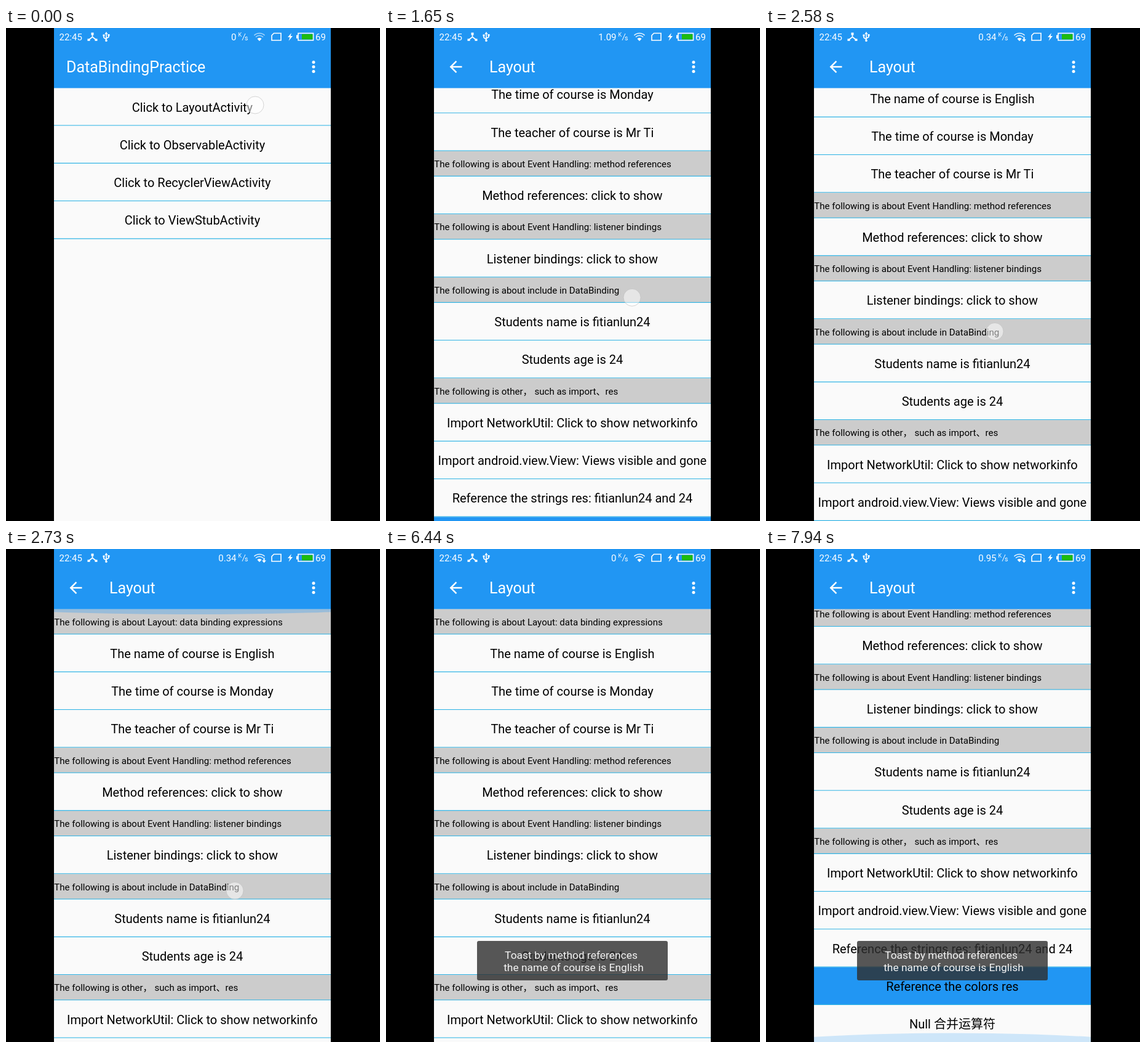
These frames come from a looping animation (608x800 px, 7990 ms). An HTML page:

```html
<!DOCTYPE html>
<html lang="zh-CN">
<head>
<meta charset="utf-8">
<style>
html, body { margin: 0; width: 100%; height: 100%; overflow: hidden; background: #000; }
svg { display: block; }
text { font-family: Roboto, "Noto Sans CJK SC", "Noto Sans CJK", sans-serif; white-space: pre; }
.row { font-size: 20px; text-anchor: middle; fill: #000; }
.head { font-size: 15.07px; fill: #000; }
.title { font-size: 25px; fill: #fff; }
.status { font-size: 15px; fill: #fff; }
.toast { font-size: 17.4px; text-anchor: middle; fill: #f4f4f4; }
.line { fill: none; stroke: #fff; stroke-width: 1.6; }
.white { fill: #fff; }
</style>
</head>
<body>
<svg width="608" height="800" viewBox="0 0 608 800">
  <clipPath id="phone"><path d="M78 0h450v800h-450z"/></clipPath>
  <rect width="608" height="800"/>
  <g clip-path="url(#phone)">
    <g id="home"></g>
    <g id="layout"></g>
    <path fill="#2196f3" d="M78 0h450v30h-450z"/>
    <g id="status">
      <text class="status" x="86.5" y="20">22:45</text>
      <path class="line" d="M140.500 9v5.500L134 19.500M140.500 14.500L147 19.500"/>
      <path class="white" d="M138.500 7.500h4v4h-4zM132.500 17.500h4v3.500h-4zM144.500 17.500h4v3.500h-4z"/>
      <path class="line" d="M163 9v12M163 18.500l-4-3v-3M163 17l4-2.500v-3"/>
      <path class="white" d="M163 6l2.500 4h-5zM157.500 10.500h3v3h-3zM165.500 10h3v3h-3z"/>
      <circle class="white" cx="163" cy="20.500" r="1.800"/>
      <text class="status" id="speed" x="374.500" y="20" text-anchor="end"></text>
      <text class="status" x="377.500" y="14" style="font-size:9px">K</text>
      <path class="line" style="stroke-width:1" d="M389 9l-5 11"/>
      <text class="status" x="388" y="20" style="font-size:10.500px">s</text>
      <path class="line" id="waves" d="M403.500 12a12 12 0 0 1 17 0M406 14.800a8.500 8.500 0 0 1 12 0"/>
      <path class="white" d="M408.500 17.500a5 5 0 0 1 7 0l-3.500 3.800z"/>
      <path class="white" id="arrow" d="M418.500 14.500h2v4h2.500l-3.500 4-3.500-4h2.500z"/>
      <path class="line" d="M435.500 8.500h11.500v11.500h-15v-8z"/>
      <path class="white" d="M464 8l-6 7h3.500l-2 6 6.500-8h-3.500z"/>
      <path class="line" d="M475 8.500h24.500v11.500h-24.500z"/>
      <path class="white" d="M472 11.500h3v5.500h-3z"/>
      <path fill="#1dbb10" d="M481 10h17.500v8.500h-17.500z"/>
      <text class="status" x="503" y="20">69</text>
    </g>
    <g id="toast">
      <rect x="148" y="636" width="310" height="64" rx="3" fill="#2e2e2e" fill-opacity=".8"/>
      <text class="toast" x="301" y="664.500">Toast by method references</text>
      <text class="toast" x="305" y="684.500">the name of course is English</text>
    </g>
    <circle id="touch" r="14" fill="#fff" fill-opacity=".5" stroke="#bbb" stroke-opacity=".6"/>
  </g>
</svg>
<script>
const LOOP = 7990, TOP = 97.5, MAX = 237.5, BLUE = '#2196f3', PAPER = '#fafafa', GREY = '#ccc';
const $ = id => document.getElementById(id);

// Entries starting with "#" are section heads, "!" marks the blue row.
function list(items, lastLine) {
  let y = TOP;
  return items.map((item, i) => {
    const head = item[0] === '#', blue = item[0] === '!';
    const h = head ? 41.25 : 61.25, top = y;
    y += h;
    const fill = head ? GREY : blue ? BLUE : PAPER;
    const line = i < items.length - 1 || lastLine;
    return `<rect x="78" y="${top}" width="450" height="${h}" fill="${fill}"/>` +
      (line ? `<rect x="78" y="${y - 1.25}" width="450" height="1.25" fill="#33b5e5"/>` : '') +
      (head ? `<text class="head" x="78.3" y="${top + 26}">${item.slice(1)}</text>`
            : `<text class="row" x="302.9" y="${top + 38}">${blue ? item.slice(1) : item}</text>`);
  }).join('');
}

const back = '<path class="white" transform="translate(98.5 48) scale(1.25)" ' +
  'd="M20 11H7.83l5.59-5.59L12 4l-8 8 8 8 1.41-1.41L7.83 13H20v-2z"/>';
const bar = (title, x, extra = '') =>
  `<rect x="78" width="450" height="${TOP}" fill="${BLUE}"/>${extra}` +
  `<text class="title" x="${x}" y="72.3">${title}</text>` +
  [55.5, 63, 70.5].map(y => `<circle class="white" cx="500" cy="${y}" r="2.5"/>`).join('');
const paper = `<rect x="78" width="450" height="800" fill="${PAPER}"/>`;

$('home').innerHTML = paper + list(['Layout', 'Observable', 'RecyclerView', 'ViewStub']
  .map(name => `Click to ${name}Activity`), true) + bar('DataBindingPractice', 98);

const about = '#The following is about ';
$('layout').innerHTML = paper + '<g id="rows">' + list([
  about + 'Layout: data binding expressions',
  'The name of course is English',
  'The time of course is Monday',
  'The teacher of course is Mr Ti',
  about + 'Event Handling: method references',
  'Method references: click to show',
  about + 'Event Handling: listener bindings',
  'Listener bindings: click to show',
  about + 'include in DataBinding',
  'Students name is fitianlun24',
  'Students age is 24',
  '#The following is other， such as import、res',
  'Import NetworkUtil: Click to show networkinfo',
  'Import android.view.View: Views visible and gone',
  'Reference the strings res: fitianlun24 and 24',
  '!Reference the colors res',
  'Null 合并运算符'
]) + `</g><ellipse id="glow" cx="303" rx="675" fill="${BLUE}"/>` + bar('Layout', 168, back);

// Piecewise linear value through [time, value] points
function at(t, ...points) {
  let [t0, v0] = points[0];
  if (t <= t0) return v0;
  for (const [t1, v1] of points) {
    if (t < t1) return v0 + (v1 - v0) * (t - t0) / (t1 - t0);
    [t0, v0] = [t1, v1];
  }
  return v0;
}

// Touches: start, end, x, y; a fifth value is the list scroll at which a drag begins
const touches = [
  [0, 100, 405, 125],
  [1440, 1690, 400, 560, 0],
  [2270, 2880, 372, 310, MAX],
  [5880, 6030, 390, 391],
  [7420, 7690, 400, 560, 0]
];

function draw(t) {
  const slide = 1 - (1 - at(t, [150, 0], [460, 1])) ** 3;
  $('layout').setAttribute('transform', `translate(${450 * (1 - slide)} 0)`);
  $('home').setAttribute('transform', `translate(${-110 * slide} 0)`);

  const scroll = at(t, [1470, 0], [1560, 50], [1690, 155], [1830, MAX],
    [2320, MAX], [2420, 190], [2580, 55], [2690, 0],
    [7460, 0], [7560, 50], [7700, 155], [7870, MAX]);
  $('rows').setAttribute('transform', `translate(0 ${-scroll})`);

  // Overscroll glow: a flattened circle beyond the list edge
  const depth = at(t, [1830, 0], [1910, 19], [1980, 21], [2220, 0],
    [2680, 0], [2730, 8.5], [2880, 13], [3350, 0], [7870, 0], [7940, 14.5], [7990, 18]);
  const alpha = at(t, [1830, 0], [1900, .36], [1980, .36], [2220, 0],
    [2680, 0], [2730, .3], [2880, .36], [3350, 0], [7870, 0], [7940, .2], [7990, .3]);
  const squash = depth / 90.4, upper = t > 2250 && t < 3400;
  const glow = $('glow');
  glow.setAttribute('cy', upper ? TOP - 584.6 * squash : 800 + 584.6 * squash);
  glow.setAttribute('ry', 675 * squash);
  glow.setAttribute('opacity', alpha);

  const touch = touches.find(p => t >= p[0] && t < p[1]);
  $('touch').setAttribute('visibility', touch ? 'visible' : 'hidden');
  if (touch) {
    const [, , x, y, from] = touch;
    const pull = at(t, [2690, 0], [2730, 7], [2880, 16]);
    const dy = from === undefined ? 0 : from - scroll + (from ? pull : 0);
    $('touch').setAttribute('cx', x);
    $('touch').setAttribute('cy', y + dy);
  }

  $('toast').setAttribute('opacity', at(t, [6130, 0], [6440, 1]));
  $('speed').textContent = t < 880 ? '0' : t < 1850 ? '1.09' : t < 4740 ? '0.34' : t < 7630 ? '0' : '0.95';
  $('waves').setAttribute('opacity', t < 880 ? .6 : .9);
  $('arrow').setAttribute('visibility', t >= 2270 && t < 3200 || t >= 6910 ? 'visible' : 'hidden');
}

let start;
function tick(now) {
  start ??= now;
  draw((now - start) % LOOP);
  requestAnimationFrame(tick);
}
draw(0);
requestAnimationFrame(tick);
</script>
</body>
</html>
```
